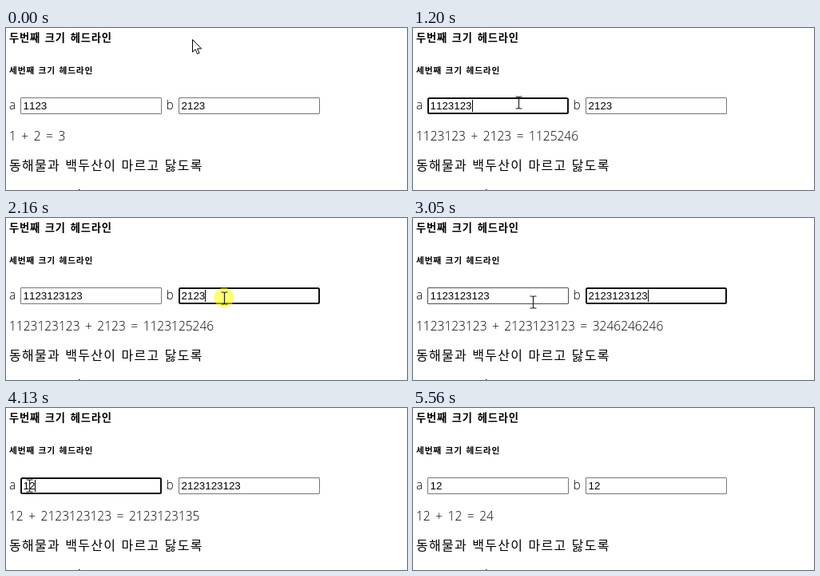
An HTML page that plays this animation: 502x203 px, repeating every 5.7 s.

```html
<!DOCTYPE html>
<html lang="ko">
<head>
<meta charset="utf-8">
<title>Adding two inputs</title>
<style>
  html, body { margin: 0; width: 100%; height: 100%; overflow: hidden; background: #fff; }
  svg { display: block; width: 502px; height: 203px; }
  text { white-space: pre; font-kerning: none; }
  .ko { font-family: "Noto Sans CJK KR", "Noto Sans CJK", "Noto Sans CJK JP", sans-serif; }
  .h5 { font-size: 13.28px; font-weight: 700; letter-spacing: .8px; word-spacing: 1.3px; }
  .h6 { font-size: 10.72px; font-weight: 700; letter-spacing: .8px; word-spacing: .8px; }
  .p { font-size: 16px; font-weight: 350; letter-spacing: 1.28px; word-spacing: .5px; }
  .latin { font-family: "Open Sans", "Noto Sans", sans-serif; font-size: 15.5px; font-weight: 350; word-spacing: 2.5px; }
  .value { font-family: "Liberation Sans", Arial, sans-serif; font-size: 13.333px; }
</style>
</head>
<body>
<svg id="stage" viewBox="0 0 502 203">
  <text class="ko h5" x="4" y="17">두번째 크기 헤드라인</text>
  <text class="ko h6" x="4" y="56.5">세번째 크기 헤드라인</text>
  <text class="latin" x="4" y="102">a</text>
  <text class="latin" x="200.5" y="102">b</text>
  <g id="fields"></g>
  <text class="latin" id="sum" x="4" y="141"></text>
  <text class="ko p" x="4" y="178">동해물과 백두산이 마르고 닳도록</text>
  <path d="M91 202h1.5v1h-1.5z" fill="#222"/>
  <circle id="press" r="12.5" fill="#ff0" opacity=".55"/>
  <path id="arrow" d="M.5 .5V16.2L4.1 12.8L6.6 18.5L9 17.4L6.6 11.9H11.6Z" fill="#fff" stroke="#000"/>
  <path id="beam" d="M-4 -7.5H-1L0 -6.5L1 -7.5H4 M0 -6.5V6.5 M-4 7.5H-1L0 6.5L1 7.5H4" fill="none" stroke="#222" stroke-width="1.2"/>
</svg>
<script>
const LOOP = 5700, FRAME = 70.5, BLINK = 530, DIGIT = 7.415;
const $ = id => document.getElementById(id);

function add(parent, tag, attrs) {
  const el = document.createElementNS("http://www.w3.org/2000/svg", tag);
  for (const k in attrs) el.setAttribute(k, attrs[k]);
  return parent.appendChild(el);
}

function makeField(x) {
  const g = $("fields"), left = x + 3.6;
  const box = add(g, "rect", { fill: "#fff" });
  const mark = add(g, "rect", { y: 90, height: 15, fill: "#3297fd" });
  const text = add(g, "text", { class: "value", x: left, y: 102 });
  const plain = add(text, "tspan", {});
  const picked = add(text, "tspan", { fill: "#fff" });
  const caret = add(g, "rect", { y: 90, width: 1, height: 15 });

  return (value, focused, caretOn, selecting, [mx, my]) => {
    const hover = mx >= x && mx < x + 177 && my >= 87 && my < 108;
    const w = focused ? 2 : 1;
    const attrs = {
      x: x + w / 2, y: 87 + w / 2, width: 177 - w, height: 21 - w, rx: w - .5,
      "stroke-width": w, stroke: focused ? "#101010" : hover ? "#4f4f4f" : "#767676"
    };
    for (const k in attrs) box.setAttribute(k, attrs[k]);

    const n = value.length;
    const from = selecting
      ? Math.min(n, Math.max(0, Math.round((mx - left) / DIGIT))) : n;
    mark.setAttribute("x", Math.floor(left));
    mark.setAttribute("x", Math.floor(left + from * DIGIT));
    mark.setAttribute("width", (n - from) * DIGIT);
    plain.textContent = value.slice(0, from);
    picked.textContent = value.slice(from);
    caret.setAttribute("x", Math.round(left + n * DIGIT));
    caret.style.display = focused && caretOn && from === n ? "" : "none";
  };
}

const drawA = makeField(18), drawB = makeField(216);

// Page events: only the changed properties are listed.
const events = [
  [0, { a: "1123", b: "2123", sum: "1 + 2 = 3", focus: "", drag: false }],
  [580, { focus: "a" }],
  [1060, { a: "11231" }],
  [1130, { a: "112312" }],
  [1200, { a: "1123123", add: true }],
  [1340, { a: "11231231" }],
  [1410, { a: "112312312" }],
  [1480, { a: "1123123123", add: true }],
  [2090, { focus: "b" }],
  [2360, { b: "21231" }],
  [2430, { b: "212312" }],
  [2500, { b: "2123123", add: true }],
  [2830, { b: "21231231" }],
  [2910, { b: "212312312" }],
  [2970, { b: "2123123123", add: true }],
  [3380, { focus: "a", drag: true }],
  [3930, { a: "1", drag: false }],
  [3990, { add: true }],
  [4060, { a: "12", add: true }],
  [4340, { focus: "b", drag: true }],
  [4680, { b: "1", drag: false, add: true }],
  [4820, { b: "12", add: true }],
  [5560, { focus: "" }]
];

function stateAt(t) {
  const s = {};
  for (const [at, change] of events) {
    if (at > t) break;
    Object.assign(s, change, { since: at });
    if (change.add) s.sum = `${s.a} + ${s.b} = ${+s.a + +s.b}`;
  }
  return s;
}

// Mouse way points: time, x, y
const path = [
  [0, 233, 14], [420, 113, 96], [580, 115, 94], [760, 118, 92], [900, 124, 88],
  [1050, 132, 93], [1640, 132, 93], [2050, 273, 100], [2800, 273, 100],
  [3015, 150, 105], [3110, 150, 105], [3330, 99, 94], [3380, 97, 95],
  [3515, 8, 98], [3585, 12, 97], [4050, 12, 97], [4310, 297, 97],
  [4370, 295, 97], [4500, 201, 97], [4800, 201, 97], [5080, 446, 210]
];
const presses = [[580, 760], [2090, 2290], [3380, 3660], [4340, 4490]];

function mouseAt(t) {
  t = Math.max(0, Math.floor((t + 8) / FRAME) * FRAME);
  const i = path.findIndex(p => p[0] > t);
  if (i < 0) return path[path.length - 1].slice(1);
  const [t0, x0, y0] = path[i - 1], [t1, x1, y1] = path[i];
  const u = (t - t0) / (t1 - t0), e = u * u * (3 - 2 * u);
  return [Math.round(x0 + (x1 - x0) * e), Math.round(y0 + (y1 - y0) * e)];
}

function place(el, [x, y], visible) {
  el.setAttribute("transform", `translate(${x} ${y})`);
  el.style.display = visible ? "" : "none";
}

function draw(t) {
  const s = stateAt(t), mouse = mouseAt(t), [x, y] = mouse;
  const caretOn = Math.floor((t - s.since) / BLINK) % 2 === 0;
  const onA = s.focus === "a", onB = s.focus === "b";
  drawA(s.a, onA, caretOn, s.drag && onA, mouse);
  drawB(s.b, onB, caretOn, s.drag && onB, mouse);
  $("sum").textContent = s.sum;

  const overText = x > 18 && x < 393 && y > 84 && y < 109;
  place($("arrow"), mouse, !overText);
  place($("beam"), [x + .5, y + .5], overText);
  place($("press"), mouseAt(t - 70), presses.some(([from, to]) => t >= from && t < to));
}

const start = performance.now();
function tick() {
  draw((performance.now() - start) % LOOP);
  requestAnimationFrame(tick);
}
tick();
</script>
</body>
</html>
```
